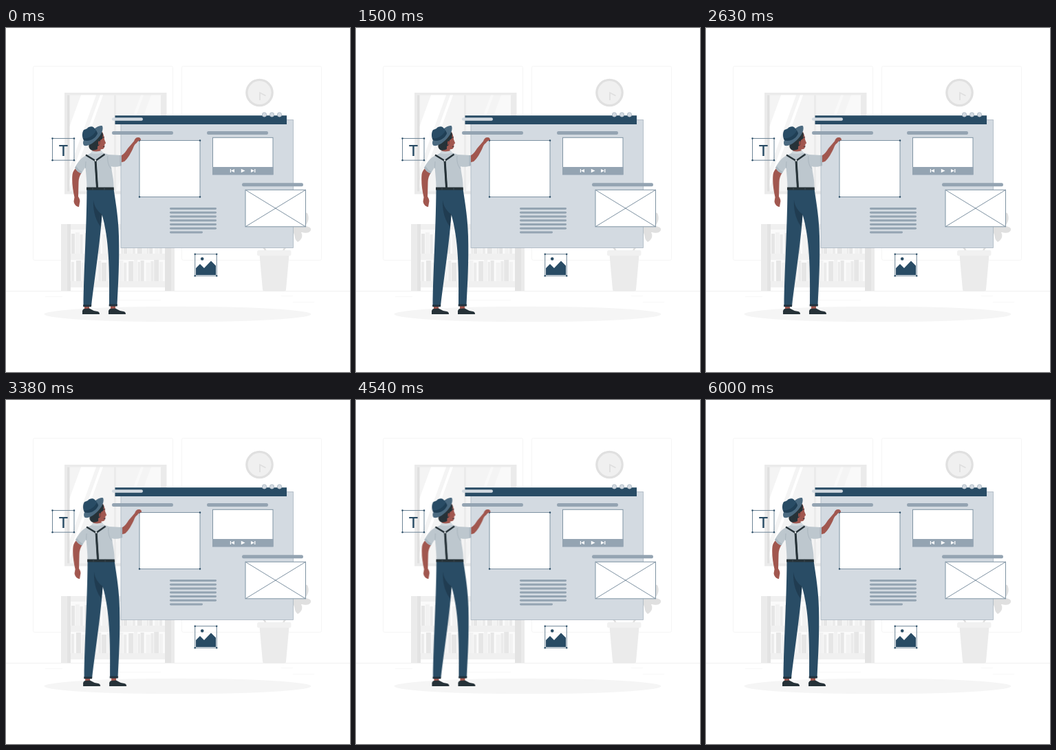
An HTML page for the animation above (6040 ms loop, 500x500 px).

```html
<!DOCTYPE html>
<html lang="en">
<head>
<meta charset="utf-8">
<title>Designer at the wireframe board</title>
<style>
  html, body { margin: 0; width: 100%; height: 100%; overflow: hidden; background: #fff; }
  svg { display: block; width: 100%; height: 100%; }
  .navy { fill: #294c65; }
  .slate { fill: #94a4b2; }
  .pale { fill: #d3dae1; }
  .ink { fill: #263238; }
  .skin { fill: #a1574f; }
  .shirt { fill: #bdc7ce; }
  .white { fill: #fff; }
  .g1 { fill: #f5f5f5; }
  .g2 { fill: #ebebeb; }
  .g3 { fill: #e0e0e0; }
  .frame { stroke: #7f93a3; stroke-width: 1; }
  .box { fill: none; stroke: #6d8496; stroke-width: 1; }
  .label { font: 500 22px Inter, Roboto, sans-serif; text-anchor: middle; }

  /* 6 s of shaking, then a short rest up to 6.04 s */
  #person { animation: shake 6040ms linear infinite; }
  @keyframes shake {
    0%, 99.338%, 100% { transform: translateX(0); }
    9.934%, 89.404% { transform: translateX(-1px); }
    19.868%, 79.47% { transform: translateX(2px); }
    29.801%, 49.669%, 69.536% { transform: translateX(-4px); }
    39.735%, 59.603% { transform: translateX(4px); }
  }
</style>
</head>
<body>
<svg viewBox="0 0 500 500">
  <!-- room -->
  <g fill="none" stroke="#f5f5f5">
    <rect x="39.5" y="55.5" width="203" height="282" rx="2"/>
    <rect x="255.5" y="55.5" width="203" height="282" rx="2"/>
    <path d="M0 382.5H500" stroke="#f0f0f0"/>
    <path d="M57 390.5H82M158 395.5H225M400 389.5H417M417 398.5H448" stroke="#f8f8f8"/>
  </g>

  <!-- window -->
  <g>
    <rect class="g2" x="85" y="94" width="148.500" height="147.500"/>
    <rect x="89" y="97.500" width="137" height="140" fill="#f4f4f4"/>
    <path class="white" d="M109 97.500H131L92 205V144ZM137 97.500H141L92 234V222Z"/>
    <path class="white" d="M160 237V195L196 97.500H200L160 208ZM211 97.500H226V150L195 237H160Z" opacity=".45"/>
    <path class="g3" d="M89 97.500H92.500V237.500H89Z"/>
    <path class="g2" d="M157 97.500H160V237.500H157ZM225 97.500H229V237.500H225Z"/>
  </g>

  <!-- clock -->
  <g>
    <circle class="g3" cx="368.500" cy="94" r="20.300"/>
    <circle cx="368.500" cy="94" r="17" fill="#f0f0f0"/>
    <path d="M369 105V94L377.500 98.500" fill="none" stroke="#dedede" stroke-width="1.600"/>
  </g>

  <!-- bookcase -->
  <g>
    <rect x="89" y="290" width="147" height="79" fill="#fafafa"/>
    <g id="books"></g>
    <path class="g2" d="M80 285H245V382H231V377H94V382H80Z M94 293V328H231V293Z M94 337V368H231V337Z" fill-rule="evenodd"/>
    <path d="M94 285H231V293H94ZM94 328H231V337H94ZM94 368H231V377H94Z" fill="#f0f0f0"/>
    <path d="M89 285H94V382H89ZM231 285H240V382H231Z" fill="#e3e3e3"/>
  </g>

  <!-- plant -->
  <g>
    <path class="g3" d="M412 291C419 289 421 281 429 278C432 271 434 268 438 269C441 275 440 282 435 287C440 290 444 289 443 294C440 300 433 297 429 297C432 302 430 308 424 311C418 307 421 300 417 297Z"/>
    <path d="M374 318L379 326M407 317L401 327" stroke="#e0e0e0" stroke-width="2.500"/>
    <path class="g2" d="M368.500 330H411.500L407 380Q407 382.500 404 382.500H376Q373 382.500 373 380Z"/>
    <rect x="365" y="323" width="49.500" height="8" rx="2.500" fill="#f1f1f1"/>
  </g>

  <ellipse class="g1" cx="249.500" cy="416" rx="194" ry="11.300"/>

  <!-- board -->
  <rect class="pale" x="167" y="133.500" width="250.500" height="186" stroke="#a9b5c0" stroke-width=".8"/>
  <rect class="navy" x="158.500" y="127.200" width="249.500" height="12.800"/>
  <rect class="pale" x="154" y="130.300" width="45" height="4.400" rx="2.200"/>
  <g class="pale" stroke="#94a4b2" stroke-width=".6">
    <circle cx="375.500" cy="126" r="3.200"/>
    <circle cx="386.500" cy="126" r="3.200"/>
    <circle cx="397.500" cy="126" r="3.200"/>
  </g>
  <g class="slate">
    <rect x="154" y="150" width="89" height="5" rx="2.300"/>
    <rect x="292" y="150" width="89" height="5" rx="2.300"/>
    <rect x="343" y="225.300" width="89" height="5" rx="2.300"/>
  </g>
  <g id="lines" class="slate"></g>

  <rect class="white frame" x="194" y="163.500" width="88" height="82"/>
  <g class="corners" data-box="194 163.500 88 82"></g>

  <rect class="white frame" x="300.500" y="159.300" width="87.500" height="53.500"/>
  <rect class="slate" x="300" y="202" width="88.500" height="11.300"/>
  <path class="white" d="M325.800 205H327V210H325.800ZM332 205V210L327 207.500ZM341.800 204.800L347.500 207.500L341.800 210.200ZM356 205L361 207.500L356 210ZM361.200 205H362.400V210H361.200Z"/>

  <rect class="white frame" x="348" y="235.300" width="87.500" height="53.500"/>
  <path class="frame" d="M348 235.300L435.500 288.800M435.500 235.300L348 288.800"/>

  <!-- loose elements -->
  <rect class="box" x="67.500" y="160.500" width="31.500" height="31.700"/>
  <g class="corners" data-box="67.500 160.500 31.500 31.700"></g>
  <text class="label navy" x="83.500" y="185.500">T</text>

  <rect class="box" x="274.700" y="328.700" width="31.500" height="31.500"/>
  <g class="corners" data-box="274.700 328.700 31.500 31.500"></g>
  <circle class="navy" cx="285.200" cy="335.500" r="2.300"/>
  <path class="navy" d="M276 359V349L282 343L288 349L298 338.500L305 345.500V359Z"/>

  <g id="person">
    <!-- far arm -->
    <path class="skin" d="M165 187C171 184 174 180 177 175L186 164.500C187 161 189 159 192 159C194 158.500 196 160 196 163C193 163.500 191 165 190 167C187 169 186 171 185 174C182 181 177 190 172 194L165 196Z"/>
    <!-- near arm -->
    <path class="skin" d="M102 203L110 210C107 215 105.500 219 105.500 224L105 245C107 248 108 251 107 254L106 260C102 260 99 256 98.500 252L99.500 246C97 235 95.500 223 96.500 213C97 209 99 206 102 203Z"/>
    <!-- ankles and shoes -->
    <g id="shoe">
      <path class="skin" d="M114 403H121V410H114Z"/>
      <path class="ink" d="M111 416V411Q112 408 114 408L121 407.500Q127 411.500 133 412Q136 412.500 136 416Z"/>
    </g>
    <use href="#shoe" x="38"/>
    <!-- trousers -->
    <path class="navy" d="M117.500 234H156.500C160 257 163.500 278 164 303C165 340 163 372 161.500 403H150C150.500 350 150 308 139.500 271C137 310 129 362 124 404H112.500C113 350 117 300 117.500 234Z"/>
    <path d="M127 250C128 260 134 267 139.500 271L137.500 289C132 281 126 269 127 250Z" fill="#203c51"/>
    <path d="M112.200 402.200H124.300L123.900 405.200H112.200ZM149.700 401.500H162L161.700 404.500H149.700Z" fill="#22333f"/>
    <!-- shirt -->
    <path class="shirt" d="M123 182L140 181L149 184L168 185V200C162 202 157 202.500 153 201C154 212 157 221 156.500 232H117.500C117.500 221 116 210 115.500 202L109.500 211.500C105 210 102 207 100 203C104 195 109 189 115 186Z"/>
    <path d="M148 186C147 193 149 201 153 205M115.500 204L116 194" fill="none" stroke="#a5b1ba" stroke-width=".8"/>
    <path d="M100 203L102 201Q105 206 110.500 209L109.500 211.500Q103 209 100 203ZM165.500 185H168V200L165.500 200.800Z" fill="#aab6bf"/>
    <!-- suspenders and belt -->
    <path d="M116 184.500L130 193L143.500 183.500M130 192.500L132.500 232" fill="none" stroke="#263238" stroke-width="2.400"/>
    <path d="M130 192.500L132.500 232" stroke="#263238" stroke-width="3"/>
    <circle cx="130" cy="192.500" r="1.200" fill="#e8edf0"/>
    <path class="ink" d="M117 231.500H156.700L157 235.500H117Z"/>
    <path d="M126 231.500V235.500M143 231.500V235.500" stroke="#46545c" stroke-width=".7"/>
    <!-- head -->
    <path class="skin" d="M126 170L136 166L138 180Q132 183 125 181Z"/>
    <path class="skin" d="M131 158L140 151C142 155 143 159 143 162L145 167Q145 168.500 143.500 168.500L143 173Q142.500 176.500 137 176.500L131 176Z"/>
    <path class="ink" d="M118 164L138 149L141 154L140 161L137 163L136 170L133 172L133 176Q129 178.500 124 177.500Q119.500 175 120.500 170Z"/>
    <path d="M134 165Q137 163 137 167Q136.500 170 134 170Z" fill="#8f4a44"/>
    <path d="M140 159.500L143 158.500M141 172.500L143.500 172.200" stroke="#263238" stroke-width=".9"/>
    <path d="M123 182L125 178.500Q132 180.500 139 178L141 181.500Q132 184 123 182Z" fill="#d0d8dd"/>
    <!-- hat -->
    <path d="M113 170.500C110 166 114 159 122 152C129 145 137 140.500 140 142.500C142 147 139 155 132 162C125 169 117 173 113 170.500Z" fill="#4b6a80"/>
    <path class="navy" d="M113 163C110.500 159 110.500 153 112 150C113 147 116 147.500 118 146C120 143 125 142.500 127.500 144.500C130 147 132 150 133 153C131 160 121 166 113 163Z"/>
    <path d="M112 160C119 162 128 156 131 149L133 153C131 160 121 166 113 163Z" fill="#203f55"/>
  </g>
</svg>
<script>
  const NS = "http://www.w3.org/2000/svg";

  function add(parent, tag, attrs) {
    const el = document.createElementNS(NS, tag);
    for (const key in attrs) el.setAttribute(key, attrs[key]);
    parent.appendChild(el);
  }

  // paragraph lines
  const lines = document.getElementById("lines");
  for (let i = 0; i < 7; i++) {
    add(lines, "rect", { x: 238, y: 261 + i * 5.75, width: i < 6 ? 68 : 48, height: 2.9, rx: 1.4 });
  }

  // selection handles
  for (const group of document.querySelectorAll(".corners")) {
    const [x, y, w, h] = group.dataset.box.split(" ").map(Number);
    for (const [cx, cy] of [[x, y], [x + w, y], [x, y + h], [x + w, y + h]]) {
      add(group, "circle", { cx, cy, r: 1.2, fill: "#294c65" });
    }
  }

  // book rows: widths cycle, heights vary
  const books = document.getElementById("books");
  const widths = [3, 5, 6, 4, 7, 5];
  const shades = ["#ebebeb", "#e6e6e6", "#f2f2f2"];
  function shelf(base, seed) {
    for (let x = 95, i = seed; x < 226; i++) {
      const width = widths[i % widths.length];
      const height = 27 + (i * 7) % 5;
      add(books, "rect", { x, y: base - height, width, height, fill: shades[i % 3] });
      x += width + (i % 4 === 3 ? 3 : 0.8);
    }
  }
  shelf(328, 1);
  shelf(368, 3);
</script>
</body>
</html>
```
